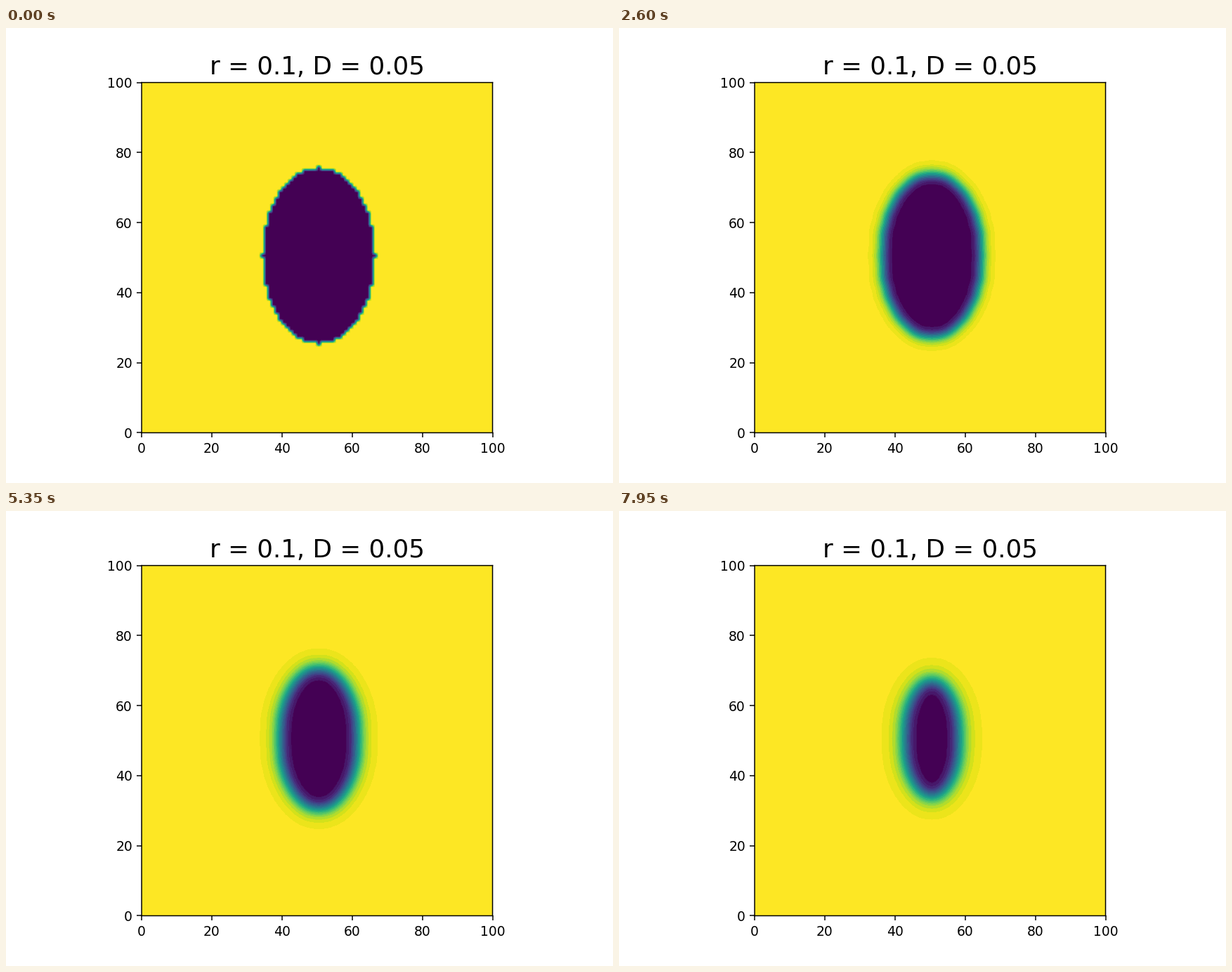
Animation, 864 px wide and 648 px high, one loop 8 s. Source, as a matplotlib script:

```python
import numpy as np
import matplotlib.pyplot as plt
from matplotlib.animation import FuncAnimation
from matplotlib.colors import ListedColormap
from matplotlib.transforms import Bbox

FRAMES, INTERVAL = 160, 50
N, R, D, DT = 100, 0.1, 0.05, 0.5

# Layout on a 1280 x 960 grid: left, bottom, width and height of the plot.
GRID_W, GRID_H = 1280, 960
LEFT, BOTTOM, WIDTH, HEIGHT = 286, 106, 740, 739


def step(u):
    """One explicit step of the Fisher-KPP equation."""
    p = np.pad(u, 1, mode="edge")
    lap = p[2:, 1:-1] + p[:-2, 1:-1] + p[1:-1, 2:] + p[1:-1, :-2] - 4 * u
    return u + DT * (D * lap + R * u * (1 - u))


def simulate():
    y, x = np.mgrid[:N, :N] - N // 2
    u = np.where((x / 16) ** 2 + (y / 25) ** 2 <= 1, 0.0, 1.0)
    states = [u]
    for _ in range(FRAMES - 1):
        states.append(step(states[-1]))
    return states


def banded_viridis():
    """Viridis flattened into bands of nearly equal colour."""
    rgb = plt.get_cmap("viridis")(np.arange(256))[:, :3]
    cells = (rgb * 255).astype(int) // [32, 16, 32]
    _, group = np.unique(cells, axis=0, return_inverse=True)
    group = group.ravel()
    out = np.array([rgb[group == g].mean(axis=0) for g in group])
    # The flat areas keep the pure end colours.
    for end in (0, 255):
        out[group == group[end]] = rgb[end]
    return ListedColormap(out)


states = simulate()
cmap = banded_viridis()

plt.rcParams["font.family"] = "DejaVu Sans"
fig = plt.figure(figsize=(6.4, 4.8), dpi=135, facecolor="white")
ax = fig.add_axes((LEFT / GRID_W, BOTTOM / GRID_H,
                   WIDTH / GRID_W, HEIGHT / GRID_H), facecolor=cmap(1.0))
image = ax.imshow(states[0], cmap=cmap, vmin=0, vmax=1, origin="lower",
                  extent=(0, 100, 0, 100 * WIDTH / HEIGHT),
                  interpolation="bilinear", aspect="auto")
ax.set(xlim=(0, 100), ylim=(0, 100),
       xticks=range(0, 101, 20), yticks=range(0, 101, 20))
ax.tick_params(labelsize=10)
ax.set_title(f"r = {R}, D = {D}", fontsize=19)

# A whole-pixel clip box keeps the image at its exact sub-pixel place.
box = ax.get_window_extent()
image.set_clip_box(Bbox([np.ceil(box.min), np.floor(box.max)]))
for line in [*ax.spines.values(), *ax.get_xticklines(), *ax.get_yticklines()]:
    line.set_snap(False)


def update(i):
    image.set_data(states[i])
    return (image,)


def init():
    return update(0)


anim = FuncAnimation(fig, update, frames=FRAMES, init_func=init,
                     interval=INTERVAL, repeat=True, repeat_delay=0)
plt.show()
```
